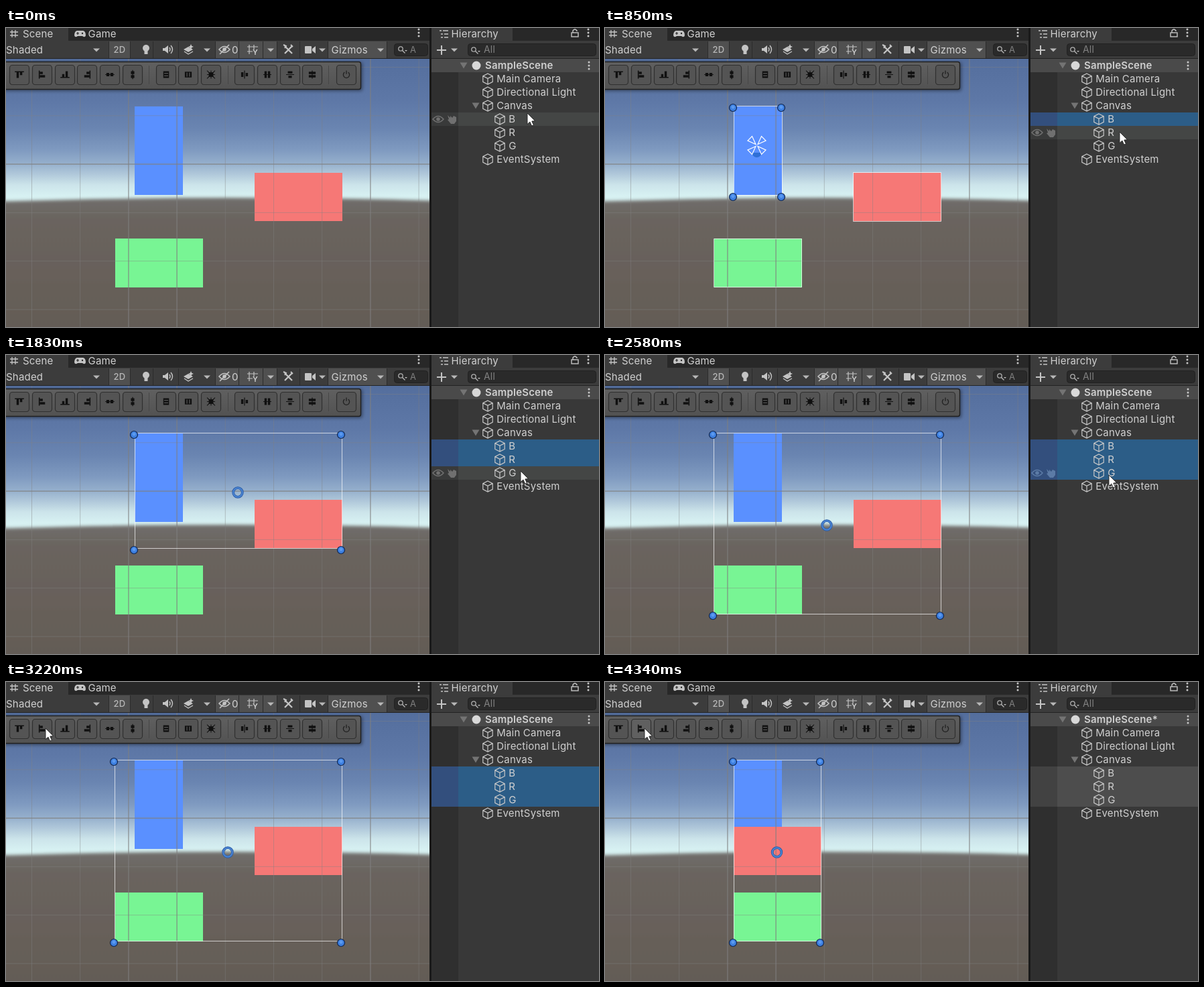
An HTML page for the animation above (5240 ms loop, 885 by 446 pixels).

```html
<!DOCTYPE html>
<html lang="en">
<head>
<meta charset="utf-8">
<title>Align objects in the scene view</title>
<style>
html, body { margin: 0; width: 885px; height: 446px; overflow: hidden; background: #383838; }
svg { display: block; }
text { font: 15px Inter, Roboto, sans-serif; letter-spacing: .2px; fill: #d0d0d0; white-space: pre; }
.dim { fill: #808080; }
.bold { font-weight: 600; }
</style>
</head>
<body>
<svg id="stage" width="885" height="446" viewBox="0 0 885 446"></svg>
<script>
const LOOP = 5240;
const stage = document.getElementById('stage');

// ---- drawing helpers ----
const rect = (x, y, w, h, fill, more = '') =>
  `<rect x="${x}" y="${y}" width="${w}" height="${h}" fill="${fill}" ${more}/>`;
const path = (d, fill, more = '') => `<path d="${d}" fill="${fill}" ${more}/>`;
const line = (d, color = '#c4c4c4', w = 1.4, more = '') =>
  path(d, 'none', `stroke="${color}" stroke-width="${w}" ${more}`);
const dot = (x, y, r, fill, more = '') => `<circle cx="${x}" cy="${y}" r="${r}" fill="${fill}" ${more}/>`;
const text = (x, y, s, more = '') => `<text x="${x}" y="${y}" ${more}>${s}</text>`;
const group = (x, y, body, more = '') => `<g transform="translate(${x} ${y})" ${more}>${body}</g>`;
const down = (x, y, r = 5, h = r, fill = '#b8b8b8') => path(`M${x - r} ${y - h / 2}h${2 * r}l${-r} ${h}z`, fill);
const fold = (x, y) => down(x, y, 5.5, 9, '#747474');
const dots = (x, y) => [-5, 0, 5].map(d => dot(x, y + d, 1.5, '#c8c8c8')).join('');
const lens = (x, y) => line(`M${x + 1.5} ${y + 1.5}l4 4`, '#b0b0b0') +
  dot(x - 1, y - 1, 3.2, 'none', 'stroke="#b0b0b0" stroke-width="1.3"') + down(x + 7, y + 2, 2);
const cube = (x, y) => group(x, y, line('M0-8L7.2-4.4V4.4L0 8L-7.2 4.4V-4.4ZM-7.2-4.4L0-.6L7.2-4.4M0-.6V8', '#c8c8c8', 1.2));
const eye = '<path d="M-8 0Q0-9 8 0Q0 9-8 0Z" fill="none" stroke-width="1.5" stroke="currentColor"/><circle r="2.8" fill="currentColor"/>';

// ---- scene view ----
function sky() {
  const stops = [[0, '#546e9d'], [16, '#5e78a7'], [26, '#6a85b1'], [34, '#7f9ac0'],
    [39, '#95afcc'], [43, '#b0c8da'], [47, '#cce4ea'], [51, '#d7f1f2'], [100, '#d7f1f2']];
  return `<defs>
    <linearGradient id="sky" x2="0" y2="1">${stops.map(([o, c]) => `<stop offset="${o}%" stop-color="${c}"/>`).join('')}</linearGradient>
    <linearGradient id="earth" x2="0" y2="1"><stop stop-color="#706e6c"/><stop offset=".15" stop-color="#6a645e"/><stop offset="1" stop-color="#635b55"/></linearGradient>
    <linearGradient id="bar" x2="0" y2="1"><stop stop-color="#606060"/><stop offset="1" stop-color="#525252"/></linearGradient>
    <filter id="soft" x="-10%" y="-20%" width="120%" height="140%"><feGaussianBlur stdDeviation="2.8"/></filter>
    <clipPath id="view"><rect y="46" width="632" height="400"/></clipPath></defs>` +
    rect(0, 46, 632, 400, 'url(#sky)') +
    path('M-20 259Q316 248 652 258V470H-20Z', 'url(#earth)', 'filter="url(#soft)"');
}

function grid() {
  let s = '';
  const bar = (d, strong) => { s += line(d, '#808080', strong ? 1.6 : 1, `opacity="${strong ? .65 : .42}"`); };
  for (let i = 0; i < 9; i++) bar(`M${38.5 + i * 72.2} 46V446`, i === 2 || i === 3 || i === 7);
  for (let i = 0; i < 6; i++) bar(`M0 ${58.5 + i * 72.3}H632`, i === 2);
  return s;
}

// ---- floating align bar ----
const boxes = (...list) => path(list.map(([x, y, w, h]) => `M${x} ${y}h${w}v${h}h${-w}z`).join(''), '#101010');
const turned = (body, how) => `<g transform="${how}">${body}</g>`;
const toTop = boxes([-8, -6, 16, 1.8], [-5, -4, 4, 10], [1, -4, 4, 5]);
const toLeft = boxes([-6, -7, 1.8, 14], [-4, -5, 5, 4], [-4, 1, 9, 4]);
const middle = boxes([-8, -.7, 16, 1.4], [-6, -3, 5, 6], [1, -3, 5, 6]);
const stack = boxes([-4, -6, 8, 3], [-4, -1.5, 8, 3], [-4, 3, 8, 3], [-5, -6, 1.4, 12], [3.6, -6, 1.4, 12]);
const pair = boxes([-.7, -7, 1.4, 14], [-6, -4, 4, 8], [2, -3, 4, 6]);
const twin = boxes([-5, -6, 4, 12], [1, -6, 4, 12], [-7, -.7, 14, 1.4]);
const icons = [
  [20, toTop], [54, toLeft], [88, turned(toTop, 'rotate(180)')], [121, turned(toLeft, 'scale(-1 1)')],
  [155, middle], [189, turned(middle, 'rotate(90)')],
  [239, stack], [272, turned(stack, 'rotate(90)')],
  [306, boxes([-4, -4, 8, 8]) + line('M-7-7L7 7M7-7L-7 7M0-7V7M-7 0H7', '#101010', 1.2)],
  [356, pair], [390, twin], [424, turned(pair, 'rotate(90)')], [457, turned(twin, 'rotate(90)')],
  [508, line('M-3.2-4A5.4 5.4 0 1 0 3.2-4M0-7V-1', '#202020', 1.5)]
];

function alignBar() {
  return rect(-8, 51, 540, 43, '#000', 'rx="3" opacity=".4" filter="url(#soft)"') +
    rect(-8, 50.5, 537.5, 41, 'url(#bar)', 'rx="3" stroke="#202020" stroke-width="1.4"') +
    [213.5, 331.5, 481.5].map(x => line(`M${x} 56V84`, '#474747', 1)).join('') +
    icons.map(([x, body], i) =>
      rect(x - 14.5, 55.5, 29, 29, '#545454', `rx="4" stroke="#303030" stroke-width="1.2" ${i === 1 ? 'id="press"' : ''}`) +
      group(x, 69.5, turned(body, 'scale(.85)'))).join('');
}

// ---- window chrome ----
function chrome() {
  const c = '#c4c4c4';
  const seps = [153, 185, 219, 257, 312, 347, 383, 404, 438, 480, 568];
  const raised = [[153, 32], [312, 35], [347, 57], [480, 88]];
  return rect(0, 0, 632, 46, '#3c3c3c') + rect(93, 0, 539, 19, '#282828') +
    rect(0, 45, 632, 1, '#232323') + rect(632, 0, 3, 446, '#191919') +
    line('M9 3V14M14 3V14M6 6H18M6 11H18', c, 1.3) + text(25, 14, 'Scene') +
    path('M106 4H115Q119 5 119 11Q118 15 114 12H107Q103 15 102 11Q102 5 106 4Z', c) +
    line('M105 8H109M107 6V10', '#282828', 1.2) + dot(114, 8, 1.2, '#282828') +
    text(122.5, 14, 'Game') + dots(616, 7) +
    raised.map(([x, w]) => rect(x, 20, w, 25, '#505050')).join('') +
    seps.map(x => rect(x, 20, 1, 25, '#2c2c2c')).join('') +
    text(0, 38, 'Shaded') + down(135, 33) + text(160.5, 37, '2D', 'style="font-size:13px;font-weight:500;fill:#b8b8b8"') +
    dot(209, 30, 5, c) + rect(206.5, 34, 5, 5, c) +
    path('M234 30H237L242 26V38L237 34H234Z', c) + line('M244 29Q246 32 244 35M246 26Q251 32 246 38', c) +
    path('M265 32L272 28L279 32L272 36Z', c) + line('M266 35L272 39L279 35', c) +
    path('M276 24L277.2 26.8L280 28L277.2 29.2L276 32L274.8 29.2L272 28L274.8 26.8Z', c) + down(300, 33) +
    group(326, 32, `<g color="${c}">${eye}</g>` + line('M-7 7L7-7', c, 1.6)) + text(337, 38, '0') +
    line('M363 25V39M370 25V32M360 28H376M360 35H368', c, 1.2) +
    text(368, 40, 'Y', 'style="font-size:11px;font-weight:600"') + down(395, 33) +
    line('M416 27L427 38M427 27L416 38', c, 2.3) + line('M414 25L418 27L416 30M425 25L428 28', c, 2) +
    rect(446, 27, 10, 11, c, 'rx="1"') + path('M457 31L462 27V38L457 34Z', c) + down(472, 33) +
    text(485.5, 38, 'Gizmos') + down(559, 33) +
    rect(579.5, 23.5, 50, 18, '#2a2a2a', 'rx="4" stroke="#212121"') + lens(590, 32) + text(603, 37, 'A', 'class="dim" style="font-size:13px"');
}

const ROWS = ['B', 'R', 'G'];
function hierarchy() {
  const item = (x, y, s) => cube(x, y) + text(x + 13.2, y + 5, s);
  return rect(635, 0, 250, 46, '#3c3c3c') + rect(756, 0, 129, 19, '#282828') + rect(635, 45, 250, 1, '#232323') +
    rect(635, 46, 40, 400, '#2f2f2f') + rect(675, 46, 210, 400, '#383838') +
    rect(635, 46, 250, 20, '#4a4a4a') +
    line('M647 4H650M652 4H660M649 9H652M654 9H660M649 14H652M654 14H660', '#c4c4c4', 1.6) +
    text(664.5, 14, 'Hierarchy') + dots(869, 7) +
    rect(844, 7, 10, 6, 'none', 'stroke="#c4c4c4" stroke-width="1.4"') + line('M846 7V4Q849 0 852 4V5') +
    line('M643 33H657M650 26V40', '#c4c4c4', 2) + down(669, 33) +
    rect(689.5, 23.5, 191, 18, '#2a2a2a', 'rx="4" stroke="#212121"') + lens(699, 33) + text(713, 37, 'All', 'class="dim" style="font-size:14px"') +
    ROWS.map((_, i) => rect(635, 126 + 20 * i, 40, 20, 'none', `id="strip${i}"`) +
      rect(675, 126 + 20 * i, 210, 20, 'none', `id="row${i}"`)).join('') +
    fold(683, 56) + dot(702, 56, 6.5, '#d8d8d8') +
    text(715, 61, 'SampleScene<tspan id="star">*</tspan>', 'class="bold"') + dots(870, 56) +
    item(719, 76, 'Main Camera') + item(719, 96, 'Directional Light') +
    fold(701, 116) + item(719, 116, 'Canvas') +
    ROWS.map((s, i) => item(737, 136 + 20 * i, s)).join('') + item(719, 196, 'EventSystem') +
    `<g id="eyes">${group(645, 0, eye)}${path('M659-6L663-2V-5L666-2L668-5L672-3V3L669 7H664L659 1L661 0Z', 'currentColor')}</g>`;
}

const petals = [0, 90, 180, 270].map(a =>
  turned(line('M1.5-1.5L13.5-7L7-13.5Z', '#fff', 1.2), `rotate(${a})`)).join('');
const handle = i => `<g id="knob${i}">${dot(0, 0, 5.5, '#3d7fe0', 'stroke="#10254c" stroke-width="1.2"')}${dot(0, -1, 2.5, '#5b9af0')}</g>`;

stage.innerHTML = `<g clip-path="url(#view)">` + sky() +
  rect(192, 117, 72, 132, '#5a90ff') +
  rect(371, 216, 131, 72, '#f67876', 'id="red"') + rect(163, 314, 131, 73, '#78f594', 'id="green"') + grid() +
  `<g id="thin" fill="none" stroke="#fff" stroke-opacity=".65"><path d="M370.5 215.5h131v73h-131zM162.5 314.5h131v72h-131z"/></g>` +
  `<g id="frame"><rect id="edge" fill="none" stroke="#fff" stroke-opacity=".68"/>
   <g id="ring">${dot(0, 0, 6.8, 'none', 'stroke="#2b5ca6" stroke-width="3.8"')}${dot(0, 0, 6.8, 'none', 'stroke="#4a84d2" stroke-width="2"')}</g>` +
  group(226.5, 175, path('M-7 11A7 7 0 0 0 7 11Z', '#2f6fd6') + petals, 'id="anchor"') +
  [0, 1, 2, 3].map(handle).join('') + '</g>' + alignBar() + '</g>' + chrome() + hierarchy() +
  dot(0, 0, 15, '#d0c818', 'id="click" opacity=".82"') +
  path('M0 0V16.5L3.9 13L6.6 19L9.4 17.8L6.8 12L11.6 11.7Z', '#fff', 'id="arrow" stroke="#222" stroke-width=".9"');

// ---- motion ----
const moves = [[0, 778, 127], [30, 777, 128], [110, 774, 132], [700, 774, 132], [850, 768, 155], [1640, 768, 155],
  [1830, 768, 173], [2550, 768, 173], [2580, 752, 179], [2640, 710, 184], [2760, 465, 148], [2880, 200, 100],
  [2940, 144, 88], [3060, 86, 66], [3120, 84, 65], [3220, 59, 69], [LOOP, 59, 69]];
const clicks = [[380, 550], [1360, 1480], [2180, 2320], [4100, 4160]];
// start, left, top, right, bottom of the selection frame
const frames = [[470, 192, 116, 264, 249], [1420, 192, 116, 501, 288], [2250, 162, 116, 501, 386], [4160, 192, 116, 322, 386]];

function cursorAt(t) {
  const i = moves.findIndex((m, k) => k && t < m[0]);
  const [t0, x0, y0] = moves[i - 1], [t1, x1, y1] = moves[i];
  const p = Math.floor((t - t0) / 30) * 30 / (t1 - t0);
  return [Math.round(x0 + (x1 - x0) * p), Math.round(y0 + (y1 - y0) * p)];
}

const el = {};
stage.querySelectorAll('[id]').forEach(e => el[e.id] = e);
const set = (e, attrs) => { for (const k in attrs) e.setAttribute(k, attrs[k]); };
const place = (e, x, y) => set(e, { transform: `translate(${x} ${y})` });
const show = (e, on) => { e.style.display = on ? '' : 'none'; };

function draw(t) {
  const [cx, cy] = cursorAt(t);
  const step = frames.filter(f => t >= f[0]).length;
  const picked = Math.min(step, 3), aligned = step === 4, idle = t >= 4190;
  const hover = cx > 635 ? Math.floor((cy - 126) / 20) : -1;

  place(el.arrow, cx, cy);
  place(el.click, cx, cy);
  show(el.click, clicks.some(([a, b]) => t >= a && t < b));
  show(el.star, t >= 4340);
  set(el.press, { fill: t >= 4130 ? '#606060' : '#545454' });

  ROWS.forEach((_, i) => {
    const on = i < picked, over = i === hover;
    set(el['row' + i], { fill: on ? (idle ? '#4d4d4d' : '#2c5d87') : over ? '#444645' : 'none' });
    set(el['strip' + i], { fill: on ? (idle ? '#424242' : '#334f7d') : over ? '#393a3a' : 'none' });
  });
  show(el.eyes, hover >= 0);
  place(el.eyes, 0, 136 + 20 * hover);
  set(el.eyes, { color: hover < picked ? '#5c7ba6' : '#707070' });

  set(el.red, { x: aligned ? 192 : 371 });
  set(el.green, { x: aligned ? 192 : 163 });
  show(el.thin, step === 1);
  show(el.frame, step > 0);
  if (!step) return;
  const [, x0, y0, x1, y1] = frames[step - 1];
  set(el.edge, { x: x0 + .5, y: y0 + .5, width: x1 - x0, height: y1 - y0 });
  [x0 - 1, x1 - 1].forEach((x, i) => [y0 + 3, y1 + 3].forEach((y, j) => place(el['knob' + (i * 2 + j)], x, y)));
  show(el.anchor, step === 1);
  show(el.ring, step > 1);
  place(el.ring, (x0 + x1) / 2 - .5, (y0 + y1) / 2 + 3);
}

const begin = performance.now();
function tick() {
  draw((performance.now() - begin) % LOOP);
  requestAnimationFrame(tick);
}
tick();
</script>
</body>
</html>
```
